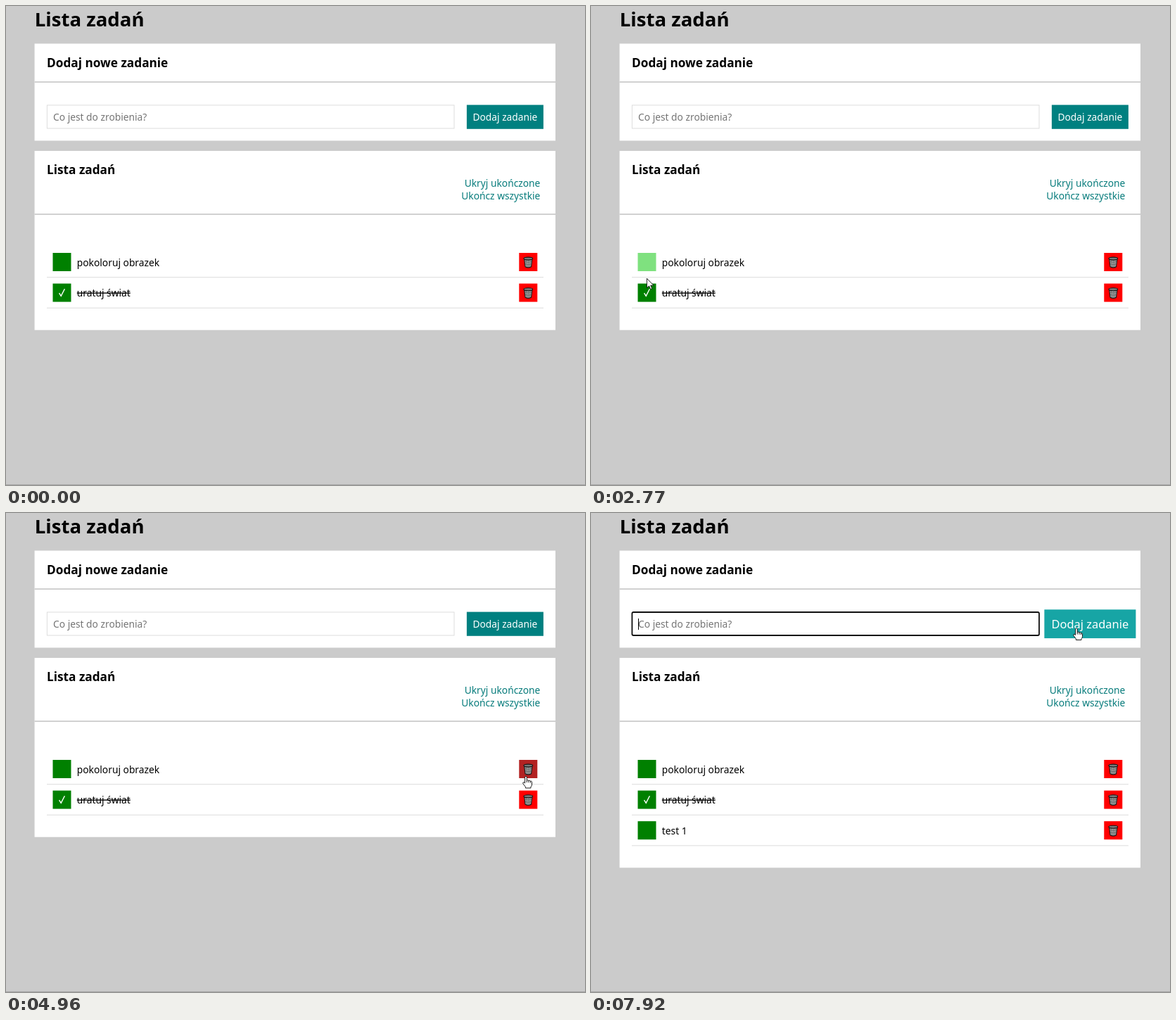
An HTML page for the animation above (7990 ms loop, 823x681 px).

```html
<!DOCTYPE html>
<html lang="pl">
<head>
<meta charset="utf-8">
<title>Lista zadań</title>
<style>
  html, body { margin: 0; width: 100%; height: 100%; overflow: hidden; background: #cbcbcb; }
  svg { display: block; }
  text { font: 13.79px "Noto Sans", "Open Sans", sans-serif; white-space: pre; }
  .h1 { font-size: 27.57px; font-weight: 700; }
  .h2 { font-size: 17.23px; font-weight: 700; }
  .link { fill: #087c7c; text-anchor: end; }
  .done { text-decoration: line-through; }
  .hint { fill: #757575; }
  .card { fill: #fff; }
  .rule { fill: #cbcbcb; }
  #field { fill: #fff; stroke: #ddd; }
  #field.focus { stroke: #101010; stroke-width: 1.8; rx: 2px; }
</style>
</head>
<body>
<svg width="823" height="681" viewBox="0 0 823 681">
  <defs>
    <g id="bin" stroke-linejoin="round">
      <path d="M-5.7 -5 L-4.3 6.4 Q0 8.8 4.3 6.4 L5.7 -5 Z" fill="#a2a2a2" stroke="#151515" stroke-width="1.1"/>
      <path d="M-3 -3 L-2 6.5 M0 -3 V7 M3 -3 L2 6.5 M-5 -1 Q0 1 5 -1 M-4.6 2.4 Q0 4.4 4.6 2.4" fill="none" stroke="#555" stroke-width=".6"/>
      <ellipse cy="-5.2" rx="6.4" ry="2" fill="#777" stroke="#151515" stroke-width="1.1"/>
    </g>
  </defs>
  <rect width="823" height="681" fill="#cbcbcb"/>
  <rect y="680" width="823" height="1" fill="#a8a8a8"/>
  <text class="h1" x="40.8" y="29.3">Lista zadań</text>

  <rect class="card" x="40.6" y="53.5" width="740.4" height="138"/>
  <rect class="rule" x="40.6" y="107.2" width="740.4" height="1.75"/>
  <text class="h2" x="58" y="86.6">Dodaj nowe zadanie</text>
  <rect id="field" x="58.4" y="141" width="578.6" height="33"/>
  <text id="entry" x="67" y="163"></text>
  <rect id="caret" y="150" width="1" height="16"/>
  <g id="add">
    <rect id="addBox" x="654.9" y="140.6" width="109" height="34.2"/>
    <text x="709.4" y="163" fill="#fff" text-anchor="middle">Dodaj zadanie</text>
  </g>

  <rect id="list" class="card" x="40.6" y="206" width="740.4"/>
  <rect class="rule" x="40.6" y="295.2" width="740.4" height="1.75"/>
  <text class="h2" x="58" y="239.4">Lista zadań</text>
  <text class="link" x="759.4" y="257">Ukryj ukończone</text>
  <text class="link" x="759.4" y="275">Ukończ wszystkie</text>
  <g id="rows"></g>

  <path id="arrow" d="M.5 .5 V14 L3.6 11.2 L5.7 15.8 L7.8 14.9 L5.8 10.4 H10 Z" fill="#fff" stroke="#111" stroke-width=".9"/>
  <g id="hand" fill="#fff" stroke="#111" stroke-width=".95" stroke-linejoin="round">
    <path d="M-1.4 10 V1.2 Q0 -.8 1.3 1.2 V6.2 Q2.8 5 4 6.6 Q5.6 5.6 6.5 7.2 Q8 6.6 8.5 8.4 V12 Q8.5 14 7 15.2 V17 H-.6 V15.4 L-4.2 10.6 Q-4.4 8.4 -2.8 8.8 Z"/>
    <path d="M1.3 6.2 V9 M4 6.6 V9.3 M6.5 7.2 V9.6" fill="none"/>
  </g>
  <path id="beam" d="M-3.5 -6.5 H-1 L0 -6 L1 -6.5 H3.5 M0 -6 V6 M-3.5 6.5 H-1 L0 6 L1 6.5 H3.5" fill="none" stroke="#111" stroke-width="1.2"/>
</svg>
<script>
const LOOP = 7990, ENTER = 320, FOCUS = 5690, TYPE = 6040, KEY_GAP = 205, ADDED = 7870;
const PITCH = 43.6, TASK = 'test 1';
const $ = id => document.getElementById(id);

const speedUp = u => u * u;
const slowDown = u => u * (2 - u);
const smooth = u => u * u * (3 - 2 * u);

// Pointer moves: departure, arrival, destination, easing
const MOVES = [
  [0, ENTER, 556, 676, smooth],
  [ENTER, 930, 680.5, 163, smooth],
  [1480, 2020, 190, 358, speedUp],
  [2060, 2450, 78, 366, slowDown],
  [2600, 2960, 80, 411, smooth],
  [3430, 3883, 662, 408, smooth],
  [3900, 4400, 738, 402, smooth],
  [4400, 4640, 739, 374, smooth],
  [5040, 5600, 442, 152.5, smooth],
  [7300, 7615, 690, 163.5, smooth]
];

const ZONES = { add: [654, 140, 765, 177] };
const TEXTS = [[58, 140, 638, 175]];
for (const i of [0, 1]) {
  const y = 351 + i * PITCH;
  ZONES['check' + i] = [66, y, 93, y + 26];
  ZONES['bin' + i] = [729, y, 756, y + 26];
  TEXTS.push([101, y + 4, 219 - 41 * i, y + 22]);
}

$('rows').innerHTML = ['pokoloruj obrazek', 'uratuj świat', TASK].map((label, i) => {
  const done = i === 1;
  const mark = done ? '<path d="M75.6 364.6 L78.2 368.8 L83.4 358.6" fill="none" stroke="#fff" stroke-width="1.4"/>' : '';
  return `<g id="row${i}" transform="translate(0 ${i * PITCH})">
    <rect id="check${i}" x="66.5" y="351" width="26" height="26" fill="green"/>${mark}
    <text x="100.8" y="369.5"${done ? ' class="done"' : ''}>${label}</text>
    <rect id="bin${i}" x="729.3" y="351" width="26" height="26" fill="red"/>
    <use href="#bin" x="742.3" y="364.3"/>
    <rect x="58" y="385.2" width="706" height="1" fill="#ddd"/>
  </g>`;
}).join('');

const lerp = (a, b, p) => a + (b - a) * p;
const mix = (a, b, p) => `rgb(${a.map((v, i) => Math.round(lerp(v, b[i], p)))})`;
const set = (el, attrs) => { for (const k in attrs) el.setAttribute(k, attrs[k]); };
const show = (el, on) => set(el, { visibility: on ? 'visible' : 'hidden' });
const inside = ([x, y], [l, t, r, b]) => x >= l && x <= r && y >= t && y <= b;

function pointer(t) {
  const next = MOVES.findIndex(m => m[0] > t), i = next < 0 ? MOVES.length - 1 : next - 1;
  const [t0, t1, x, y, easing] = MOVES[i], from = MOVES[Math.max(0, i - 1)];
  const p = easing(Math.min(1, (t - t0) / (t1 - t0)));
  return [lerp(from[2], x, p), lerp(from[3], y, p)];
}

// When the pointer enters and leaves each control
const hovers = {};
for (const id in ZONES) {
  const spans = hovers[id] = [];
  let was = false;
  for (let t = ENTER; t < LOOP; t += 5) {
    const now = inside(pointer(t), ZONES[id]);
    if (now && !was) spans.push([t, LOOP]);
    if (was && !now) spans[spans.length - 1][1] = t;
    was = now;
  }
}

// CSS "ease" curve
function ease(p) {
  if (p <= 0) return 0;
  if (p >= 1) return 1;
  let lo = 0, hi = 1;
  for (let i = 0; i < 20; i++) {
    const u = (lo + hi) / 2, x = .75 * u * (1 - u) + u ** 3;
    if (x < p) lo = u; else hi = u;
  }
  return .3 * lo * (1 - lo) ** 2 + 3 * lo * lo * (1 - lo) + lo ** 3;
}

function hover(id, t, ms) {
  const span = hovers[id].filter(s => t >= s[0]).pop();
  if (!span) return 0;
  const peak = ease((Math.min(t, span[1]) - span[0]) / ms);
  return peak * (1 - ease((t - span[1]) / ms));
}

function cursorAt(pos) {
  if (Object.values(ZONES).some(z => inside(pos, z))) return 'hand';
  return TEXTS.some(z => inside(pos, z)) ? 'beam' : 'arrow';
}

function draw(t) {
  const grow = hover('add', t, 500);
  set($('add'), { transform: `translate(709.4 157.8) scale(${1 + .2 * grow}) translate(-709.4 -157.8)` });
  set($('addBox'), { fill: mix([0, 128, 128], [24, 166, 166], grow) });
  for (const i of [0, 1]) {
    set($('check' + i), { fill: mix([0, 128, 0], [144, 238, 144], hover('check' + i, t, 500)) });
    set($('bin' + i), { fill: mix([255, 0, 0], [178, 34, 34], hover('bin' + i, t, 300)) });
  }

  const focus = t >= FOCUS, added = t >= ADDED, entry = $('entry');
  const keys = added ? 0 : Math.max(0, Math.floor((t - TYPE) / KEY_GAP) + 1);
  const value = TASK.slice(0, keys);
  set($('field'), { class: focus ? 'focus' : '' });
  entry.textContent = value || 'Co jest do zrobienia?';
  set(entry, { class: value ? '' : 'hint' });
  show($('caret'), focus);
  set($('caret'), { x: 67 + (value ? entry.getComputedTextLength() : 0) });

  show($('row2'), added);
  set($('list'), { height: 254.7 + (added ? PITCH : 0) });

  const pos = pointer(t), kind = cursorAt(pos);
  for (const id of ['arrow', 'hand', 'beam']) {
    show($(id), t >= ENTER && id === kind);
    set($(id), { transform: `translate(${pos})` });
  }
}

const start = performance.now();
function tick() {
  draw((performance.now() - start) % LOOP);
  requestAnimationFrame(tick);
}
tick();
</script>
</body>
</html>
```
